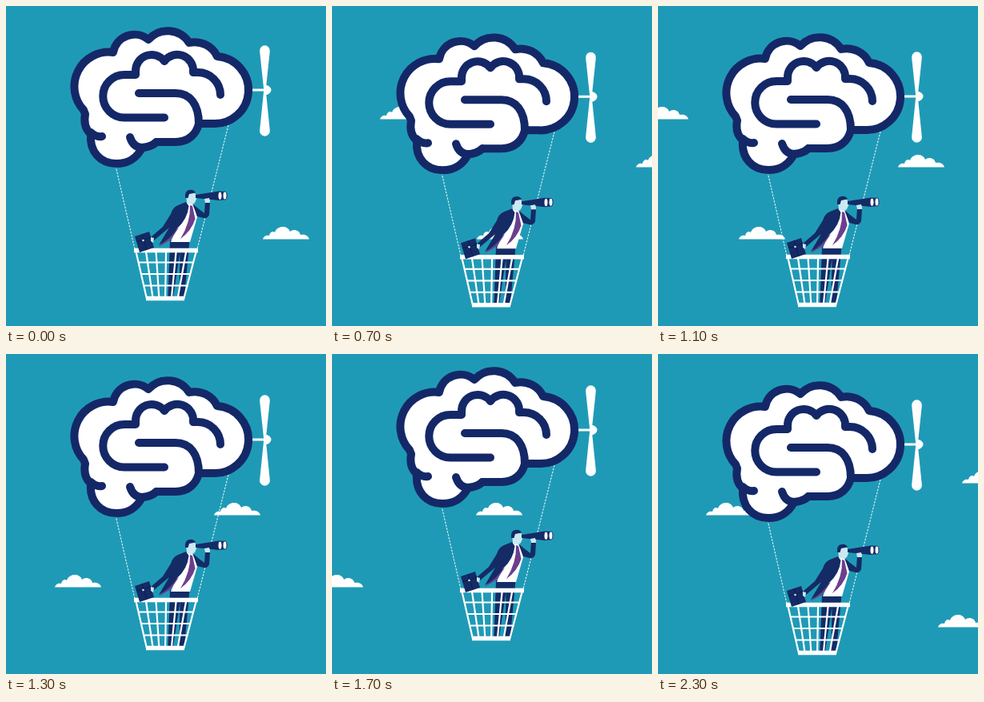
An HTML page that plays this animation: 400 px wide and 400 px high, repeating every 2.4 s.

```html
<!DOCTYPE html>
<html lang="en">
<head>
<meta charset="utf-8">
<title>Brain balloon</title>
<style>
html, body { margin: 0; width: 100%; height: 100%; overflow: hidden; background: #1f9ab6; }
svg { display: block; width: 100%; height: 100%; }
.line { fill: none; stroke: #142868; stroke-width: 10; stroke-linecap: round; stroke-linejoin: round; }
.rope { stroke: #fff; stroke-width: 1; stroke-dasharray: 2.5 1.5; }
.navy { fill: #142b66; }
.skin { fill: #c9e9f3; }
.white { fill: #fff; }
.plum { fill: #6b3f8d; }
</style>
</head>
<body>
<svg viewBox="0 0 400 400">
  <defs>
    <path id="cloud" d="M0 .5C1-4 5-5 8-4C9-9 13-10 15-8C18-17 31-17 34-9C38-13 46-11 47-5C52-6 57-4 58 .5Z"/>
  </defs>
  <g id="sky" class="white"></g>
  <g id="balloon">
    <path class="rope" d="M137 200L161 304M278 149L239 304"/>

    <!-- propeller -->
    <g class="white">
      <path d="M300 103.5H325V106.5H300Z"/>
      <path d="M322.300 105L317.200 57A6.400 6.500 0 1 1 329.800 57L324.700 105L329.800 155A6.400 6.500 0 1 1 317.200 155Z"/>
      <path d="M323 98.500A8.500 6.500 0 0 1 323 111.500Z"/>
    </g>

    <!-- brain -->
    <path class="line" style="fill:#fff" d="M106 160C99 154 97 146 99 135L97 130A43 43 0 0 1 134 58A27 27 0 0 1 178 42A32 32 0 0 1 229 46A31 31 0 0 1 264 63A42 42 0 0 1 258 147H241C238 160 228 170 212 170H188Q182 176 170 177C164 190 152 197 138 197C118 197 104 182 106 160Z"/>
    <path class="line" d="M106 158Q112 164 120 163M155 164Q159 177 171 177Q182 176 188 170M166 109H212C230 109 241 123 241 147
      M198 139.500H148A26.700 26.700 0 0 1 148 86H162V82A20 20 0 0 1 198 69A20 20 0 0 1 234 83H240A28 28 0 0 1 268 111"/>

    <!-- traveller -->
    <path class="navy" d="M205 293H229.500L223 363H216.500L217.500 308L209 363H202.500Z"/>
    <path class="white" d="M226 246L234 246L239 264L230 295H206Z"/>
    <path class="plum" d="M230 249L233 250L236.500 266Q232 281 218 291Q231 270 230 249Z"/>
    <path class="plum" d="M216 277L206 292L191 301L207 283Z"/>
    <path class="navy" d="M225 245L215 249Q208 252 206 260L196 276L181 289L185 293L204 277L191 299Q206 291 214 278Q227 266 228.500 250Z"/>
    <path class="navy" d="M233 247L240 253L248 259L249 245L255 246L254 261Q252 266 247 265L239 263Z"/>
    <path class="skin" d="M225 234L236 233L238.500 240L236 246L232 248L226 247Z"/>
    <path class="navy" d="M224 240Q223 231 229 230Q235 229 237 233.500L229 235L227.500 240Z"/>
    <path class="navy" d="M237 236L266 231.500L275 232V242L266 243L237 240Z"/>
    <path class="skin" d="M248 241L254 240L255 246L249 246Z"/>
    <g class="white" stroke="#142b66">
      <ellipse cx="267.500" cy="237.300" rx="2.500" ry="5"/>
      <ellipse cx="273.500" cy="237" rx="2.500" ry="5"/>
    </g>

    <!-- basket and briefcase -->
    <path id="basket" fill="none" stroke="#fff" stroke-width="2.200"/>
    <path d="M160 305.500H240M175 365.500H223" stroke="#fff" stroke-width="5.500"/>
    <path class="navy" d="M161 288L179 282L185 302L167 308Z"/>
    <path d="M163 294L172 293L181 288M170 285L176 305" fill="none" stroke="#0c1c50"/>
    <circle class="skin" cx="171.500" cy="293" r="1.300"/>
    <path class="skin" d="M181 289L185 290L184 296L181 294Z"/>
  </g>
</svg>
<script>
const LOOP = 2400, STEP = 100, SPEED = 20;
const starts = [[321, 291], [520, 201], [200, 141], [810, 341], [840, 161]];
const bob = [[0, 0], [200, -6], [900, 14], [1700, -10], [2300, 8]];
const byId = id => document.getElementById(id);

const sky = byId('sky');
const clouds = starts.map(([x, y]) => {
  const el = document.createElementNS('http://www.w3.org/2000/svg', 'use');
  el.setAttribute('href', '#cloud');
  el.setAttribute('y', y);
  sky.append(el);
  return { el, x };
});

// Basket mesh tapers from rim to base.
let mesh = '';
for (let i = 0; i <= 6; i++) mesh += `M${162 + i * 12.7} 305L${176 + i * 7.7} 366`;
for (const y of [320.5, 335, 349.5]) {
  const inset = (y - 305) * 14 / 61;
  mesh += `M${162 + inset} ${y}H${238 - inset}`;
}
byId('basket').setAttribute('d', mesh);

function lift(t) {
  const i = Math.max(1, bob.findIndex(k => k[0] >= t));
  const [t0, y0] = bob[i - 1], [t1, y1] = bob[i];
  return y0 + (y1 - y0) * (t - t0) / (t1 - t0);
}

const begin = performance.now();
function draw() {
  const step = Math.floor((performance.now() - begin) % LOOP / STEP);
  for (const { el, x } of clouds) el.setAttribute('x', x - SPEED * step);
  byId('balloon').setAttribute('transform', `translate(0 ${lift(step * STEP)})`);
  requestAnimationFrame(draw);
}
draw();
</script>
</body>
</html>
```
